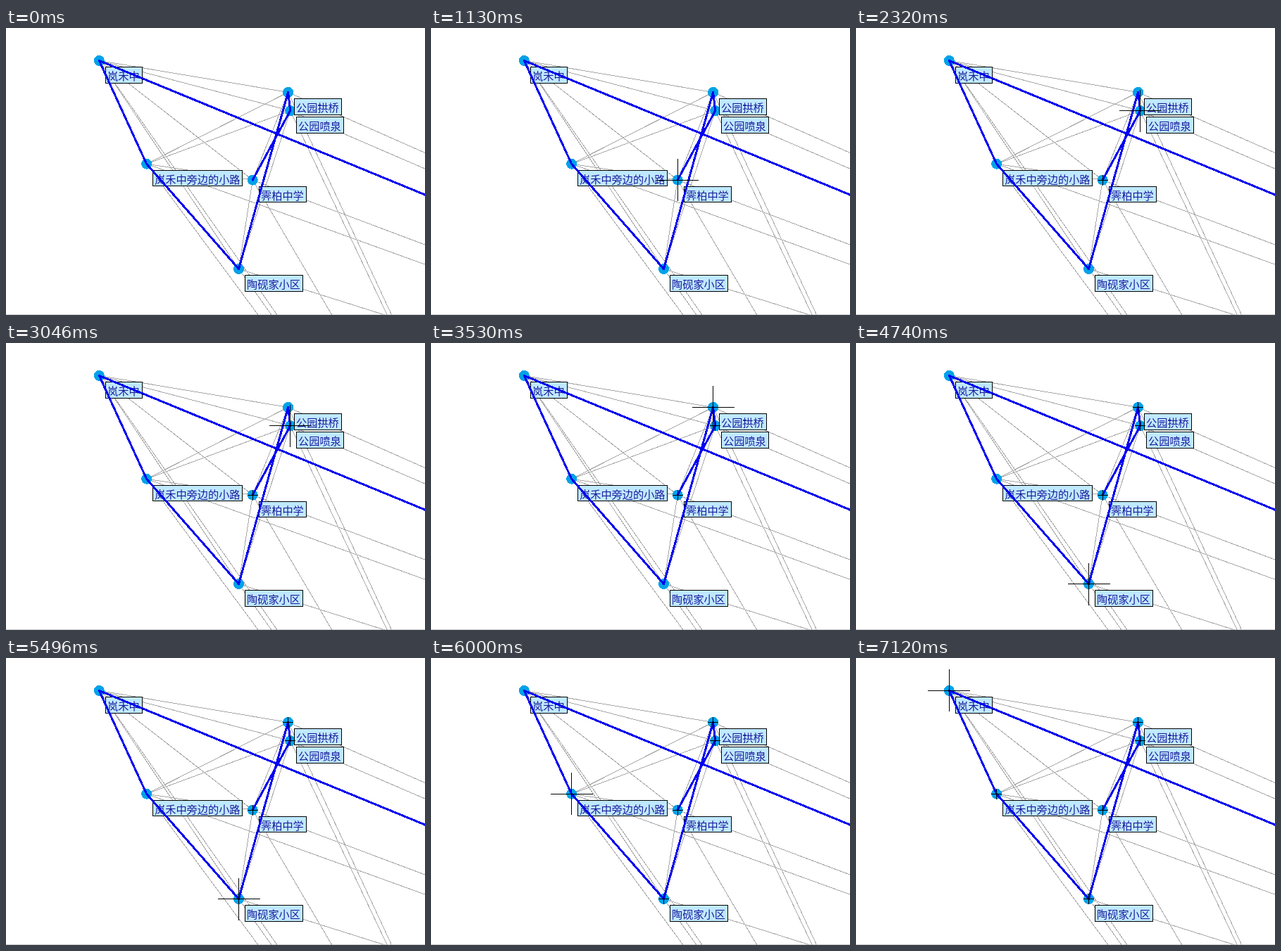
An HTML page that plays this animation: 595x408 px, repeating every 8 s.

```html
<!DOCTYPE html>
<html lang="zh-CN">
<head>
<meta charset="utf-8">
<style>
  html, body { margin: 0; overflow: hidden; background: #fff; }
  svg { display: block; shape-rendering: crispEdges; }
  path { fill: none; stroke-linejoin: round; stroke-linecap: round; }
  circle { fill: #00a2e8; }
  .label { fill: #bfe9ff; stroke: #000; }
  text { font: 15.2px "Noto Sans CJK SC", "Noto Sans CJK", sans-serif; fill: #1c1c9c; dominant-baseline: central; }
</style>
</head>
<body>
<svg width="595" height="408"></svg>
<script>
const svg = document.querySelector('svg');
const LOOP = 8000;

// Nodes in route order; the cursor reaches each one at time `at`.
const stops = [
  { x: 350.2, y: 216.1, at: 1130, name: '霁柏中学' },
  { x: 403.7, y: 117.6, at: 2320, name: '公园喷泉' },
  { x: 400.6, y: 91.4, at: 3530, name: '公园拱桥' },
  { x: 330.5, y: 342.5, at: 4740, name: '陶砚家小区' },
  { x: 199.6, y: 193.2, at: 6000, name: '岚禾中旁边的小路' },
  { x: 132.3, y: 46.4, at: 7120, name: '岚禾中' }
];
// Two more nodes lie outside the view.
const nodes = [...stops, { x: 2548, y: 1042 }, { x: 869, y: 1100 }];

const line = (points, color, width) =>
  `<path d="M${points.map(p => `${p.x} ${p.y}`).join('L')}" stroke="${color}" stroke-width="${width}"/>`;

const dot = ({ x, y }) => `<circle cx="${x}" cy="${y}" r="7.5"/>`;

function label({ x, y, name }) {
  const left = Math.floor(x + 9), top = Math.floor(y + 9);
  const right = Math.floor(x + 15.5 + name.length * 15.1), bottom = Math.floor(y + 31.7);
  return `<rect class="label" x="${left + 0.5}" y="${top + 0.5}" width="${right - left}" height="${bottom - top}"/>
    <text x="${left + 3}" y="${top + 11.5}">${name}</text>`;
}

function cross({ x, y }, reach) {
  return `<path stroke="#000" stroke-linecap="butt" style="stroke-linecap:butt"
    d="M${x - reach} ${Math.floor(y) + 0.5}h${2 * reach}M${Math.floor(x) + 0.5} ${y - reach}v${2 * reach}"/>`;
}

const edges = nodes.flatMap((a, i) => nodes.slice(i + 1).map(b => line([a, b], '#a8a8a8', 1)));
svg.innerHTML = [
  '<rect y="407" width="595" height="1" fill="#c8c8c8"/>',
  ...edges,
  ...stops.map(dot),
  ...stops.map(label),
  line(nodes.slice(0, 7), '#0000f0', 3),
  '<g></g>'
].join('');
const cursor = svg.querySelector('g');

let shown = 0;
function frame() {
  const time = performance.now() % LOOP;
  const reached = stops.filter(s => s.at <= time);
  if (reached.length !== shown) {
    shown = reached.length;
    // Visited dots keep the part of the cross that lies inside them.
    cursor.innerHTML = reached.map((s, i) => cross(s, i === shown - 1 ? 30 : 7.5)).join('');
  }
  requestAnimationFrame(frame);
}
frame();
</script>
</body>
</html>
```
